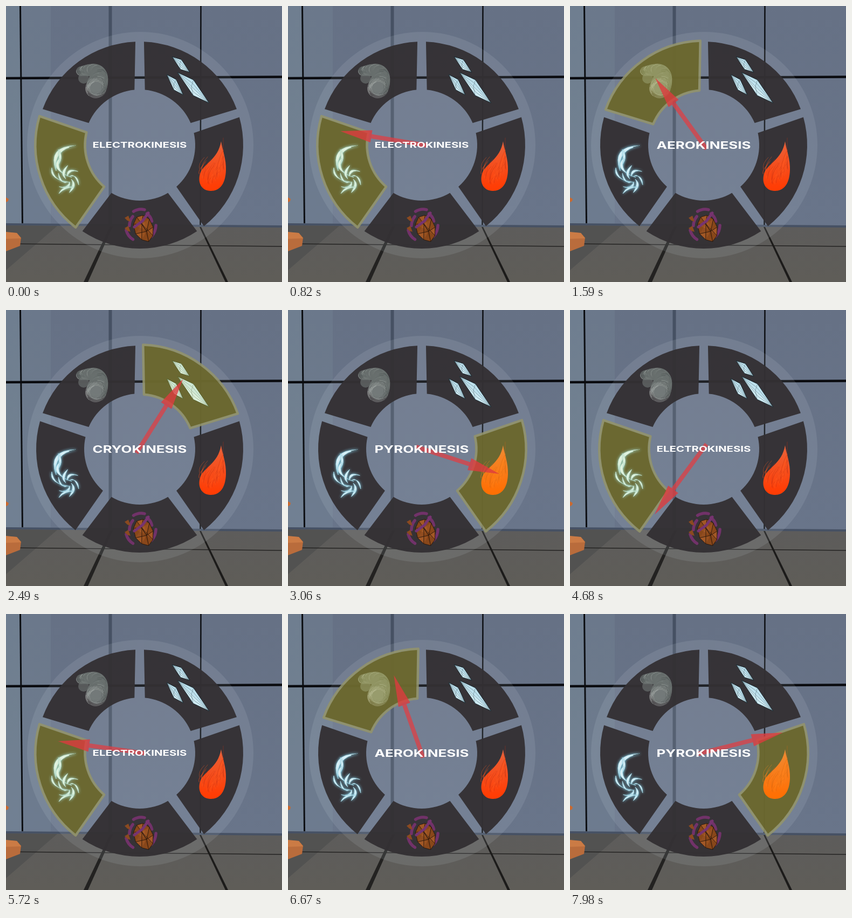
An HTML page with a canvas that plays this animation: 512x512 px, repeating every 8000 ms.

```html
<!DOCTYPE html>
<html lang="en">
<head>
<meta charset="utf-8">
<title>Power wheel</title>
<style>
  html, body { margin: 0; width: 100%; height: 100%; overflow: hidden; background: #667286; }
  canvas { display: block; width: 512px; height: 512px; }
</style>
</head>
<body>
<canvas id="stage" width="512" height="512"></canvas>
<script>
const LOOP = 8000, CX = 248, CY = 258, RAD = Math.PI / 180, TURN = Math.PI * 2;
const stage = document.getElementById('stage');
const view = stage.getContext('2d');
const scene = document.createElement('canvas');
scene.width = scene.height = 512;
let g = scene.getContext('2d');

// Clockwise from the top; each sector spans 72 degrees.
const POWERS = ['CRYOKINESIS', 'PYROKINESIS', 'TELEKINESIS', 'ELECTROKINESIS', 'AEROKINESIS'];

// Pointer swings: start, end, final angle, ease-out power.
const FIRST_ANGLE = 162;
const SWINGS = [
  [40, 820, 189, 1], [820, 1220, 234, 3], [1590, 2120, 302, 1], [2490, 3060, 378, 1],
  [3430, 4220, 461, 3], [4460, 4990, 522, 1], [5530, 6060, 594, 1],
  [6530, 7070, 657, 1], [7240, 7340, 668, 1], [7640, 8000, 708, 1]
];

function pointerAngle(t) {
  let angle = FIRST_ANGLE;
  for (const [start, end, target, power] of SWINGS) {
    const u = Math.min(1, Math.max(0, (t - start) / (end - start)));
    angle += (target - angle) * (1 - (1 - u) ** power);
    if (u < 1) break;
  }
  return angle;
}

function randomizer(seed) {
  return () => (seed = (seed * 16807) % 2147483647) / 2147483647;
}

function trace(points, closed) {
  g.beginPath();
  for (let i = 0; i < points.length; i += 2) g.lineTo(points[i], points[i + 1]);
  if (closed) g.closePath();
}

function fill(points, color) {
  trace(points, true);
  g.fillStyle = color;
  g.fill();
}

function line(points, color, width) {
  trace(points);
  g.strokeStyle = color;
  g.lineWidth = width;
  g.stroke();
}

function ring(x, y, rx, ry, tilt, from, to, color, width) {
  g.beginPath();
  g.ellipse(x, y, rx, ry, tilt, from, to);
  g.strokeStyle = color;
  g.lineWidth = width;
  g.stroke();
}

function disc(x, y, r, color) {
  g.beginPath();
  g.arc(x, y, r, 0, TURN);
  g.fillStyle = color;
  g.fill();
}

function gradient(y0, y1, a, b) {
  const s = g.createLinearGradient(0, y0, 0, y1);
  s.addColorStop(0, a);
  s.addColorStop(1, b);
  return s;
}

// Grown sectors reach further on every side.
function sector(i, grow = 0) {
  const mid = (306 + 72 * i) * RAD;
  const outer = (33.3 + grow * 0.33) * RAD, inner = (30 + grow * 0.6) * RAD;
  g.beginPath();
  g.arc(CX, CY, 191 + grow, mid - outer, mid + outer);
  g.arc(CX, CY, 104 - grow, mid + inner, mid - inner, true);
  g.closePath();
}

function drawRoom() {
  g.fillStyle = gradient(0, 410, '#667185', '#69758a');
  g.fillRect(0, 0, 512, 512);
  for (const edge of [28, 83]) {
    g.fillStyle = 'rgba(130,152,166,.17)';
    g.fillRect(0, 0, edge, 408);
  }
  fill([0, 403, 512, 407, 512, 512, 0, 512], '#465164');
  fill([0, 407, 512, 411, 512, 512, 0, 512], gradient(407, 512, '#5d5c5b', '#5f5d58'));
  fill([0, 407, 95, 408, 0, 490], '#525251');
  line([193.5, 0, 193.5, 407], '#465163', 6);
  line([26.5, 0, 30.5, 403], '#0c0e12', 3);
  line([361.5, 0, 360.5, 406], '#0c0e12', 2.5);
  line([0, 134, 512, 131.5], '#0a0b0f', 4.5);
  line([0, 441, 512, 446], '#242322', 1.5);
  fill([193, 409, 198, 409, 152, 512, 144, 512], '#232221');
  fill([359, 410, 362, 410, 412, 512, 407, 512], '#1c1b1a');
  fill([0, 355, 5, 358, 4, 362, 0, 364], '#c9692f');
  fill([0, 420, 20, 421, 28, 430, 26, 445, 0, 455], '#b96c3c');
  fill([0, 419, 20, 421, 28, 431, 0, 432], '#cb7b45');
}

function drawWheel() {
  disc(249, CY, 210, 'rgba(225,230,240,.1)');
  g.lineJoin = 'round';
  for (let i = 0; i < 5; i++) {
    sector(i, 1);
    g.fillStyle = 'rgba(51,48,51,.96)';
    g.fill();
  }
}

// A tube of strands that widens along a curve up to its open mouth.
function drawWind() {
  const rnd = randomizer(41);
  for (let u = 0; u <= 1; u += 0.05) {
    const v = 1 - u, r = 9 + 11 * u;
    const x = 139 * v * v + 370 * u * v + 167 * u * u;
    const y = 121 * v * v + 222 * u * v + 151 * u * u;
    disc(x, y, r, 'rgba(104,111,110,.75)');
    for (let k = 0; k < 9; k++) {
      const s = r * (0.5 + rnd() * 0.5), a = rnd() * TURN;
      ring(x, y, s, s * 0.85, u * 3, a, a + 0.6 + rnd(),
        rnd() < 0.6 ? 'rgba(188,195,191,.5)' : 'rgba(62,68,69,.5)', 0.8);
    }
  }
  disc(144, 134, 10, 'rgba(112,119,117,.6)');
  disc(168, 153, 13, 'rgba(118,124,124,.8)');
  for (let k = 0; k < 16; k++) {
    ring(167, 152, 12 + k * 0.55, 11 + k * 0.55, -0.6, k * 2, k * 2 + 3,
      k % 3 ? 'rgba(190,196,193,.5)' : 'rgba(80,86,86,.6)', 0.9);
  }
}

// A crystal between two tips, with facets on both sides.
function shard(x0, y0, x1, y1, wide) {
  const dx = x1 - x0, dy = y1 - y0;
  const at = (u, side) => [x0 + dx * u - dy * side * wide, y0 + dy * u + dx * side * wide];
  const tip = at(0, 0), end = at(1, 0), right = at(0.38, -1), left = at(0.62, 1);
  fill([...tip, ...right, ...end, ...left], '#bfe2ee');
  fill([...tip, ...at(0.45, 0.1), ...end, ...left], '#cfebf3');
  for (const side of [-0.45, 0.1, 0.5]) line([...tip, ...at(0.5 + side * 0.2, side), ...end], '#6b8792', 0.7);
  line([...right, ...at(0.45, 0.1), ...left], '#6b8792', 0.7);
  line([...tip, ...right, ...end, ...left, ...tip], '#16232a', 1);
}

function drawIce() {
  shard(308, 94, 341, 123, 0.17);
  shard(298, 127, 329, 165, 0.16);
  shard(318, 123, 377, 180, 0.13);
}

function drawFire() {
  const rnd = randomizer(77);
  g.fillStyle = gradient(251, 335, '#e8623a', '#ff3d05');
  g.fill(new Path2D('M399 251C401 266 409 284 408 305C407 331 396 343 380 343C363 343 355 328 360 311C366 292 393 286 399 251Z'));
  for (let k = 0; k < 60; k++) {
    const u = rnd(), x = 358 + u * 47, y = 334 - Math.abs(u - 0.45) * 45 - rnd() * 16;
    const rise = 14 + rnd() * 32 * (0.4 + u);
    g.beginPath();
    g.moveTo(x, y);
    g.quadraticCurveTo(x - 2, y - rise / 2, Math.min(403, x + 4 + rise * 0.25), y - rise);
    g.strokeStyle = k % 3 ? 'rgba(255,88,30,.5)' : 'rgba(190,48,20,.5)';
    g.lineWidth = 0.8;
    g.stroke();
  }
}

function drawRock() {
  const rnd = randomizer(9), corners = [];
  g.lineCap = 'round';
  for (let k = 0; k < 5; k++) {
    const a = 1.9 + k * 1.05;
    ring(250, 407, 28 - k % 2 * 7, 30 - k % 2 * 5, 0.2, a, a + 0.75, '#713269', 5.5);
  }
  g.lineCap = 'butt';
  for (const y of [393, 412]) fill([220, y, 227, y - 4, 231, y + 7, 225, y + 5], '#8a4a20');
  for (let k = 0; k < 9; k++) {
    const a = k / 9 * TURN, r = 1 + rnd() * 0.12;
    const px = 18 * r * Math.cos(a), py = 25 * r * Math.sin(a);
    corners.push([256 + px * 0.94 + py * 0.2, 412 + py * 0.94 - px * 0.1]);
  }
  fill(corners.flat(), '#97501f');
  corners.forEach((p, k) => {
    const q = corners[(k + 1) % 9], hub = k % 2 ? [252, 404] : [261, 418];
    fill([...p, ...q, ...hub], k % 3 ? 'rgba(80,35,10,.2)' : 'rgba(190,110,55,.3)');
    line([...hub, ...p, ...q], '#28170d', 0.9);
  });
  line([252, 404, 261, 418], '#28170d', 0.9);
  g.lineCap = 'round';
  line([238, 410, 253, 399, 264, 384], '#763470', 5);
  g.lineCap = 'butt';
}

// A tapered blade that bends through a control point.
function blade(x0, y0, cx, cy, x1, y1, w) {
  g.beginPath();
  g.moveTo(x0, y0);
  g.quadraticCurveTo(cx - w, cy - w / 2, x1, y1);
  g.quadraticCurveTo(cx + w, cy + w / 2, x0, y0);
  g.fillStyle = '#eaf9fd';
  g.fill();
  g.strokeStyle = '#9fd3e2';
  g.lineWidth = 0.8;
  g.stroke();
}

function drawBolt() {
  g.save();
  g.shadowColor = '#7fc4dc';
  g.shadowBlur = 5;
  blade(130, 259, 82, 263, 93, 306, 6);
  blade(97, 266, 106, 280, 92, 301, 4);
  blade(100, 282, 84, 305, 122, 318, 6);
  blade(85, 300, 84, 324, 118, 327, 5);
  for (let k = 0; k < 6; k++) {
    const a = k * TURN / 6, at = (r, turn) => [116 + r * Math.cos(a + turn), 321 + r * 1.2 * Math.sin(a + turn)];
    blade(...at(5, 0), ...at(17, 0.5), ...at(21, 1.5), 4);
  }
  blade(98, 348, 108, 334, 126, 336, 3);
  g.restore();
  line([117, 262, 131, 259], '#1c2226', 0.8);
}

function drawArrow(angle) {
  g.save();
  g.translate(CX - 0.7, CY - 1);
  g.rotate(angle * RAD);
  fill([-10, -4, 94, -4, 94, -11.5, 152, 0, 94, 11.5, 94, 4, -10, 4], 'rgba(224,62,68,.74)');
  fill([94, -11.5, 152, 0, 94, 11.5], 'rgba(214,50,45,.2)');
  g.restore();
}

// A wide face, sized so that every label has the same length.
function drawLabel(text) {
  const wide = 1.4, face = 'px Inter, "Open Sans", sans-serif';
  g.font = '700 100' + face;
  const size = 175 / wide / g.measureText(text).width * 100;
  g.save();
  g.translate(CX, CY + size * 0.364);
  g.scale(wide, 1);
  g.font = '700 ' + size + face;
  g.textAlign = 'center';
  g.fillStyle = '#fff';
  g.fillText(text, 0, 0);
  g.restore();
}

// Screening lifts the dark sector but leaves pale icons pale.
function drawHighlight(i) {
  g.lineJoin = 'round';
  sector(i, 1);
  g.fillStyle = 'rgba(255,240,0,.1)';
  g.fill();
  g.globalCompositeOperation = 'screen';
  g.fillStyle = 'rgb(46,46,0)';
  g.fill();
  g.globalCompositeOperation = 'source-over';
  sector(i, 2.5);
  g.strokeStyle = 'rgba(147,148,107,.88)';
  g.lineWidth = 4.5;
  g.stroke();
}

function render(t) {
  const angle = pointerAngle(t);
  const active = Math.floor((angle + 90) % 360 / 72);
  g.drawImage(scene, 0, 0);
  drawHighlight(active);
  if (t >= 40) drawArrow(angle);
  drawLabel(POWERS[active]);
}

for (const draw of [drawRoom, drawWheel, drawWind, drawIce, drawFire, drawRock, drawBolt]) draw();
g = view;

const start = performance.now();
function tick() {
  render(Math.max(0, performance.now() - start) % LOOP);
  requestAnimationFrame(tick);
}
tick();
</script>
</body>
</html>
```
